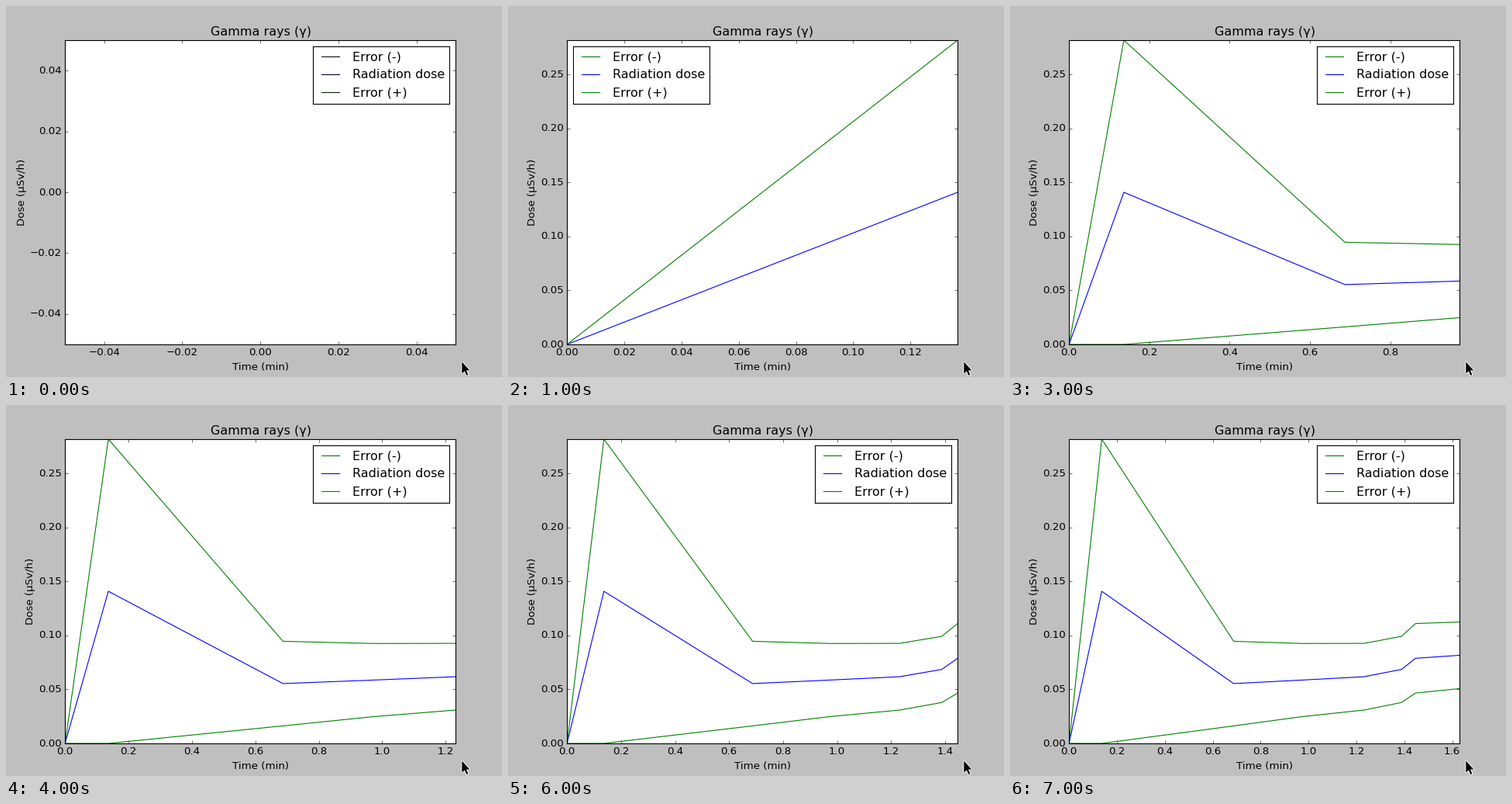
A matplotlib script for the animation above (8 s loop, 640 by 478 pixels).

```python
import matplotlib.pyplot as plt
import numpy as np
from matplotlib.animation import FuncAnimation
from matplotlib.ticker import MaxNLocator

W, H, DPI = 640, 478, 80
MEDIUM, LARGE = 12, 14.4
GREEN, BLUE = "#008000", "#0000ff"

plt.rcParams.update({
    "font.family": "DejaVu Sans",
    "font.size": MEDIUM,
    "axes.linewidth": 1,
    "lines.linewidth": 1,
    "ytick.alignment": "center",
    "toolbar": "None",
})

# Minutes at which the counter registers a particle
clicks = np.array([0, 0.1365, 0.6873, 0.973, 1.2318, 1.388, 1.447, 1.631])
DOSE_PER_RATE = 0.019
LAG = 0.0017

# Dose follows the mean count rate; its error is the Poisson 1/sqrt(n).
counts = np.arange(len(clicks))
dose = DOSE_PER_RATE * counts / (clicks - LAG)
error = dose / np.sqrt(np.maximum(counts, 1))
SERIES = [
    ("Error (-)", dose - error, GREEN, "#002000"),
    ("Radiation dose", dose, BLUE, "#000040"),
    ("Error (+)", dose + error, GREEN, "#002000"),
]
PEAK = (dose + error).max()


def place(x, y, w, h):
    """Figure fractions of a pixel box measured from the top left."""
    return [x / W, 1 - (y + h) / H, w / W, h / H]


def place_legend(x):
    legend.set_position(place(x, 52, 176, 74))


def pixel_axes(x, y, w, h, zorder):
    axes = fig.add_axes(place(x, y, w, h), zorder=zorder)
    axes.set(xlim=(0, w), ylim=(h, 0), xticks=[], yticks=[])
    return axes


fig = plt.figure(figsize=(W / DPI, H / DPI), dpi=DPI, facecolor="#bfbfbf")

ax = fig.add_axes(place(76.2, 44, 504, 392))
ax.tick_params(direction="in", length=4, width=0.5, pad=4,
               top=True, right=True, labelsize=MEDIUM)
for axis in (ax.xaxis, ax.yaxis):
    axis.set_major_locator(MaxNLocator(9, steps=[1, 2, 5, 10]))

legend = pixel_axes(396, 52, 176, 74, zorder=2)
curves, keys = [], []
for i, (label, _, color, _) in enumerate(SERIES):
    y = 13 + 23 * i
    curves += ax.plot([], [], color=color)
    keys += legend.plot([11.2, 33.6], [y, y])
    legend.text(51.2, y + 5, label, size=LARGE)

page = pixel_axes(0, 0, W, H, zorder=3)
page.axis("off")
page.text(328.5, 38, "Gamma rays (γ)", size=LARGE, ha="center")
page.text(328.5, 469, "Time (min)", ha="center")
y_label = page.text(35, 240, "Dose (µSv/h)", rotation=90,
                    rotation_mode="anchor", ha="center", va="baseline")

# Mouse pointer: black arrow over a white rim
arrow = np.array([(0, 0), (0, 15), (3.5, 12), (6, 17.5),
                  (8, 16.6), (5.7, 11), (10, 11)]) + (588.3, 458.5)
page.fill(*arrow.T, facecolor="white", edgecolor="white", linewidth=1.6)
page.fill(*arrow.T, facecolor="black", linewidth=0)


def draw(n):
    empty = n == 0
    for curve, key, (_, values, color, dark) in zip(curves, keys, SERIES):
        curve.set_data(clicks[:n + 1], values[:n + 1])
        key.set_color(dark if empty else color)
    if empty:
        ax.set(xlim=(-0.05, 0.05), ylim=(-0.05, 0.05))
    else:
        ax.set(xlim=(0, clicks[n]), ylim=(0, PEAK))
    y_label.set_x(24 if empty else 35)
    # The legend moves out of the way of the first rising line.
    place_legend(84 if n == 1 else 396)
    return curves


anim = FuncAnimation(fig, draw, frames=len(clicks), interval=1000,
                     repeat=True, repeat_delay=0, blit=False)
plt.show()
```
